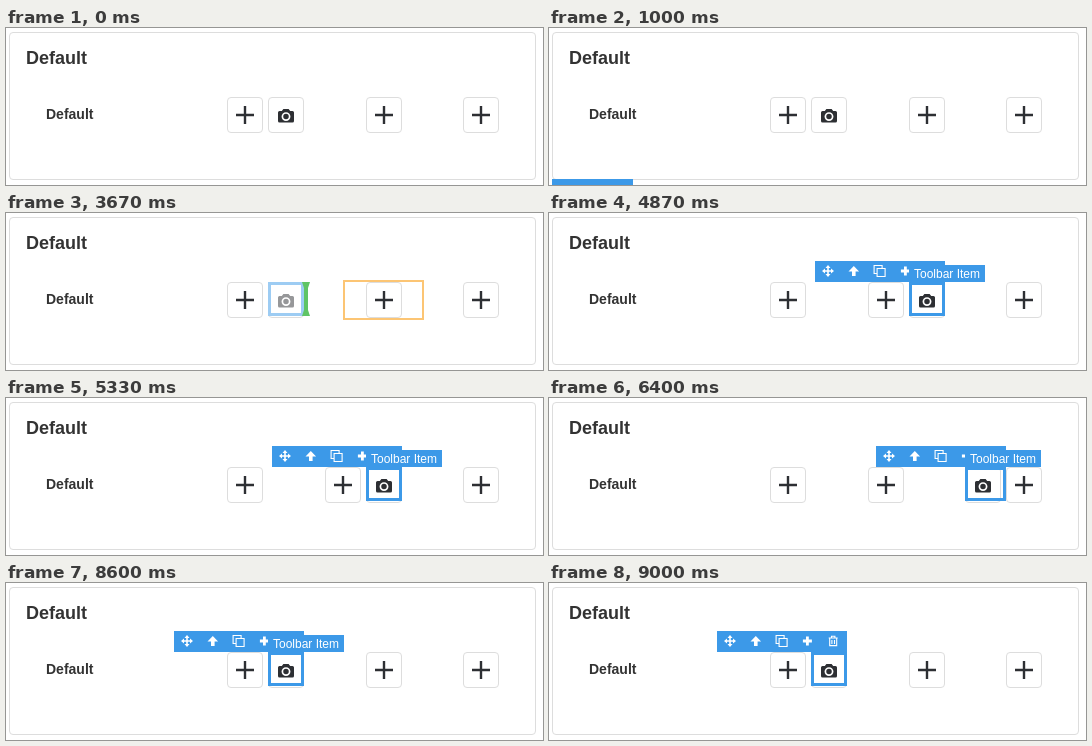
These frames come from a looping animation (537x157 px, 9.47 s). An HTML page:

```html
<!DOCTYPE html>
<html lang="en">
<head>
<meta charset="utf-8">
<title>Toolbar drag and drop</title>
<style>
  html, body { margin: 0; width: 100%; height: 100%; overflow: hidden; background: #fff; }
  svg { display: block; font-family: "Liberation Sans", Arial, sans-serif; }
</style>
</head>
<body>
<svg id="stage" width="537" height="157" viewBox="0 0 537 157"></svg>
<script>
const LOOP = 9470, STEP = 1000 / 15;
const BLUE = '#3c99e8', TINT = '#e6e6f5', INK = '#2d2f33';
const stage = document.getElementById('stage');

// Plus buttons, camera position and the width of the camera's wrapper
const layouts = {
  first: { plus: [221, 360, 457], cam: 262, w: 36 },
  second: { plus: [221, 319, 457], cam: 360, w: 36 },
  third: { plus: [221, 319, 457], cam: 416, w: 41 }
};

// Each entry holds until the next one. zone: [left, right]; mark: [from, to, duration]
const scenes = [
  { at: 0, on: 'first' },
  { at: 930, on: 'first', below: [0, 143] },
  { at: 1000, on: 'first', below: [3, 151] },
  { at: 1600, on: 'first' },
  { at: 1670, on: 'first', below: [3, 151] },
  { at: 1730, on: 'first' },
  { at: 1870, on: 'first', hover: 'panel' },
  { at: 2130, on: 'first', hover: 'cam' },
  { at: 2730, on: 'first', zone: [219, 341], mark: [300, 300, 1] },
  { at: 3670, on: 'first', zone: [337, 418], mark: [300, 398, 400] },
  { at: 4800, on: 'second', picked: true, hover: 'cam' },
  { at: 4930, on: 'second', picked: true },
  { at: 5070, on: 'second', picked: true, hover: 'panel' },
  { at: 5330, on: 'second', picked: true, hover: 'cam' },
  { at: 5670, on: 'second', zone: [296, 418], mark: [398, 398, 1] },
  { at: 5730, on: 'second', zone: [414, 495], mark: [398, 455, 200] },
  { at: 6400, on: 'third', picked: true, hover: 'cam' },
  { at: 6530, on: 'third', picked: true, hover: 'plus' },
  { at: 6670, on: 'third', picked: true },
  { at: 6730, on: 'third', picked: true, hover: 'panel' },
  { at: 6930, on: 'third', picked: true, hover: 'cam' },
  { at: 7270, on: 'third', zone: [373, 495], mark: [455, 455, 1] },
  { at: 7330, on: 'third', zone: [296, 377], mark: [455, 357, 200] },
  { at: 7930, on: 'third', zone: [219, 300], mark: [357, 259, 270] },
  { at: 8600, on: 'first', picked: true, hover: 'cam' },
  { at: 8870, on: 'first', picked: true, hover: 'panel' },
  { at: 8930, on: 'first', picked: true, hover: 'page' },
  { at: 9000, on: 'first', picked: true }
];

const rect = (x, y, w, h, fill, extra = '') =>
  `<rect x="${x}" y="${y}" width="${w}" height="${h}" fill="${fill}" ${extra}/>`;

// Border drawn inside the given box
const frame = (x, y, w, h, color, line = 1, fill = 'none', r = 0) =>
  rect(x + line / 2, y + line / 2, w - line, h - line, fill,
    `stroke="${color}" stroke-width="${line}" rx="${r}"`);

const path = (d, fill, extra = '') => `<path d="${d}" fill="${fill}" ${extra}/>`;

const text = (x, y, size, fill, str, weight = 'normal') =>
  `<text x="${x}" y="${y}" font-size="${size}" font-weight="${weight}" fill="${fill}">${str}</text>`;

const group = (x, y, body) => `<g transform="translate(${x} ${y})">${body}</g>`;

const label = (x, y, w, str) => rect(x, y, w, 17, BLUE) + text(x + 5, y + 13, 12, '#fff', str);

const button = x => frame(x, 69, 36, 36, '#ddd', 1, '#fff', 3.5);

const plusButton = x => button(x) +
  group(x + 18, 87, path('M-9 0H9M0-9V9', 'none', `stroke="${INK}" stroke-width="2.4"`));

const camera = (x, color) => group(x + 18, 88,
  path('M-6.5-5H-4.2L-2.6-7H2.6L4.2-5H6.5Q8-5 8-3.5V5Q8 6.5 6.5 6.5H-6.5Q-8 6.5-8 5V-3.5Q-8-5-6.5-5Z', color) +
  `<circle cy=".6" r="3.6" fill="${color}" stroke="#fff" stroke-width="1.7"/>`);

const icons = [
  path('M-4 0H4M0-4V4', 'none', 'stroke="#fff" stroke-width="1.6"') +
    path('M0-6L2.5-3H-2.5ZM0 6L2.5 3H-2.5ZM-6 0L-3-2.5V2.5ZM6 0L3-2.5V2.5Z', '#fff'),
  path('M0-5L5.3 .5H1.8V5H-1.8V.5H-5.3Z', '#fff'),
  path('M-2.5-2.5H5.5V5.5H-2.5ZM-2.5 2.5H-5.5V-5.5H2.5V-2.5', 'none', 'stroke="#fff" stroke-width="1.1"'),
  path('M-4.5 0H4.5M0-4.5V4.5', 'none', 'stroke="#fff" stroke-width="2.8"'),
  path('M-4.5-3H4.5M-1.7-3V-4.7H1.7V-3M-3.5-3V4.6H3.5V-3M-1.3-1V3M1.3-1V3', 'none',
    'stroke="#fff" stroke-width="1.1"')
];

const toolbar = right => rect(right - 130, 48, 130, 21, BLUE) +
  icons.map((icon, i) => group(right - 117 + i * 25.8, 58, icon)).join('');

const dropMark = x => group(x, 69,
  path('M-4 0H4L2 6V28L4 34H-4L-2 28V6Z', '#5fc465'));

function panel(hover) {
  if (hover === 'panel') {
    return frame(3, 4, 527, 148, '#4a90d0', 1, TINT) + rect(19, 20, 495, 116, '#fff') +
      label(3, -13, 81, '');
  }
  return (hover === 'page' ? rect(0, 0, 537, 157, TINT) : '') +
    frame(3, 4, 527, 148, '#ddd', 1, '#fff', 3.5);
}

function draw(s, elapsed) {
  const { plus, cam, w } = layouts[s.on];
  const dragging = Boolean(s.zone);
  let out = panel(s.hover) +
    text(20, 36, 18, '#333', 'Default', 'bold') +
    text(40, 91, 14, '#333', 'Default', 'bold') +
    plus.map(plusButton).join('') +
    button(cam) + camera(cam, dragging ? '#969799' : INK);

  if (s.below) out += label(...s.below, 84 - s.below[0], '');
  if (dragging) {
    const [left, right] = s.zone, [from, to, time] = s.mark;
    const p = Math.min(1, elapsed / time);
    out += frame(cam, 69, w, 34, '#9dccf3', 3) +
      frame(left, 67, right - left, 40, '#fcc574', 2) +
      dropMark(from + (to - from) * p * p * (3 - 2 * p));
  }
  if (s.picked) out += frame(cam, 69, w, 34, BLUE, 3) + toolbar(cam + w);
  if (s.hover === 'cam' || s.hover === 'plus') {
    const x = s.hover === 'cam' ? cam : plus[2];
    if (s.hover === 'plus' || !s.picked) out += frame(x, 69, 36, 34, BLUE);
    out += label(x, 52, 76, 'Toolbar Item');
  }
  return out;
}

let shown = '';
function tick(now) {
  const t = now % LOOP;
  const scene = scenes.findLast(s => s.at <= t);
  // Motion advances at 15 steps a second
  const elapsed = Math.floor((t - scene.at + 4) / STEP) * STEP;
  const next = draw(scene, elapsed);
  if (next !== shown) stage.innerHTML = shown = next;
  requestAnimationFrame(tick);
}
tick(0);
</script>
</body>
</html>
```
